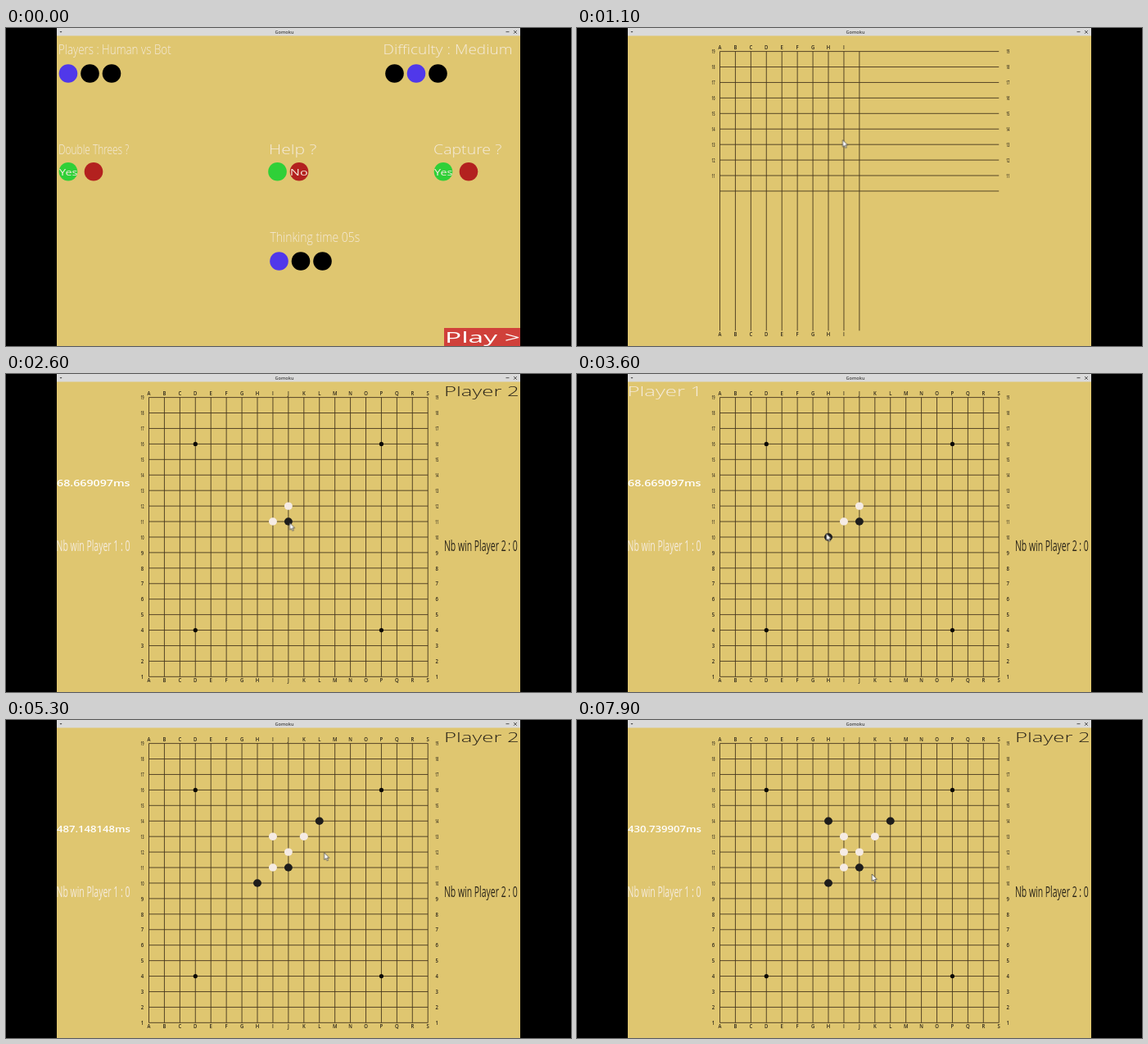
Animation, 690 px wide and 388 px high, one loop 8 s. Source, as an HTML page:

```html
<!DOCTYPE html>
<html lang="en">
<head>
<meta charset="utf-8">
<title>Gomoku</title>
<style>
  html, body { margin: 0; width: 100%; height: 100%; overflow: hidden; background: #000; }
  svg { display: block; width: 690px; height: 388px; }
  text { font-family: "Open Sans", sans-serif; white-space: pre; }
  #board line { stroke: #47371f; stroke-width: .9; }
  #cursor { animation: roam 8s linear infinite; }
  @keyframes roam {
    0%, 5% { transform: translate(586px, 377px); }
    7% { transform: translate(580px, 370px); }
    13.5%, 14.3% { transform: translate(324.5px, 136.5px); }
    20.5%, 22% { transform: translate(336px, 175.8px); }
    26%, 35% { transform: translate(346.5px, 181.5px); }
    42.5%, 49% { transform: translate(304.5px, 194.5px); }
    56%, 59% { transform: translate(381px, 121px); }
    65.5%, 67.5% { transform: translate(388.6px, 161.8px); }
    70% { transform: translate(386px, 164px); }
    80% { transform: translate(307.5px, 128px); }
    81.25%, 90% { transform: translate(304.8px, 122.5px); }
    98%, 100% { transform: translate(360.2px, 188px); }
  }
</style>
</head>
<body>
<svg viewBox="0 0 690 388">
  <rect width="690" height="388"/>
  <rect x="62" width="566" height="388" fill="#dfc670"/>
  <rect x="62" width="566" height="9.5" fill="#dadada"/>
  <text x="340" y="6.8" font-size="5.6" font-weight="600" text-anchor="middle" fill="#444">Gomoku</text>
  <path d="M65.5 4h3l-1.5 1.8z" fill="#444"/>
  <path d="M610.5 4.7h4M620 3l3.8 3.8M623.8 3l-3.8 3.8" stroke="#444" stroke-width=".9"/>
  <g id="menu"></g>
  <g id="board"></g>
  <g id="hud"></g>
  <g id="stones"></g>
  <g id="cursor"><path d="M0 0V8.7L2 6.9 3.4 9.9 4.8 9.3 3.4 6.4H6.1Z" fill="#fff" stroke="#333" stroke-width=".7"/></g>
</svg>
<script>
const LOOP = 8000, CELL = 18.93, LEFT = 174.5, TOP = 28.6;
const PALE = '#f5ebdc', DARK = '#2a2419', BLUE = '#5038ea', GREEN = '#2fd038', RED = '#b3211f';
const $ = id => document.getElementById(id);
const [menu, board, hud, stones] = ['menu', 'board', 'hud', 'stones'].map($);

function add(parent, tag, attrs, content = '') {
  const el = document.createElementNS('http://www.w3.org/2000/svg', tag);
  for (const key in attrs) el.setAttribute(key, attrs[key]);
  el.textContent = content;
  parent.append(el);
  return el;
}

// Lettering is wide or narrow by the horizontal scale.
function label(parent, str, x, y, size, scale, fill, weight = 400, anchor = 'start') {
  return add(parent, 'text', {
    transform: `translate(${x} ${y}) scale(${scale} 1)`,
    'font-size': size, 'font-weight': weight, 'text-anchor': anchor, fill
  }, str);
}

// Visible only in the given spans of the loop; each span is [from, to].
function during(el, ...spans) {
  const frames = [];
  const key = (opacity, time) => frames.push({ opacity, offset: time / LOOP, easing: 'step-end' });
  if (spans[0][0] > 0) key(0, 0);
  for (const [from, to = LOOP] of spans) {
    key(1, from);
    key(to < LOOP ? 0 : 1, to);
  }
  if (frames.at(-1).offset < 1) key(0, LOOP);
  el.animate(frames, { duration: LOOP, iterations: Infinity });
}

const dots = (x, y, gap, ...fills) => fills.forEach((fill, i) =>
  add(menu, 'circle', { cx: x + i * gap, cy: y, r: 11.3, fill }));

function drawMenu() {
  const heading = (str, x, y, scale) => label(menu, str, x, y, 17, scale, PALE, 300);
  heading('Players : Human vs Bot', 64, 32, .79);
  heading('Difficulty : Medium', 460.5, 32, 1.12);
  heading('Double Threes ?', 64.2, 154, .7);
  heading('Help ?', 321, 154, 1.24);
  heading('Capture ?', 522, 154, 1.15);
  heading('Thinking time 05s', 322.5, 261, .82);

  dots(76, 55.5, 26.5, BLUE, '#000', '#000');
  dots(474.5, 55.5, 26.5, '#000', BLUE, '#000');
  dots(76, 175.3, 31, GREEN, RED);
  dots(331.5, 175.3, 26.5, GREEN, RED);
  dots(534, 175.3, 31, GREEN, RED);
  dots(333.5, 284.5, 26.5, BLUE, '#000', '#000');

  label(menu, 'Yes', 65, 179.8, 11.5, 1.26, PALE);
  label(menu, 'No', 346.8, 179.8, 11.5, 1.4, PALE);
  label(menu, 'Yes', 523, 179.8, 11.5, 1.26, PALE);

  add(menu, 'rect', { x: 535, y: 366, width: 93, height: 22, fill: '#d0403a' });
  label(menu, 'Play >', 536, 384, 18, 1.86, '#fff');
  during(menu, [0, 600]);
}

function drawBoard() {
  const size = 18 * CELL, start = 670, step = 45;
  for (let i = 0; i < 19; i++) {
    const x = LEFT + i * CELL, y = TOP + i * CELL;
    const lines = add(board, 'g', {}), marks = add(board, 'g', {});
    add(lines, 'line', { x1: x, x2: x, y1: TOP, y2: TOP + size });
    add(lines, 'line', { x1: LEFT, x2: LEFT + size, y1: y, y2: y });

    const letter = String.fromCharCode(65 + i), row = 19 - i;
    const mark = (str, mx, my, scale) => label(marks, str, mx, my, 7, scale, DARK, 600, 'middle');
    for (const my of [26, 376.3]) mark(letter, x, my, .85);
    for (const mx of [166.5, 526.3]) mark(row, mx, y + 2.7, row > 9 ? .5 : .85);

    during(lines, [start + i * step]);
    during(marks, [start + (i + 1) * step]);
  }
  const stars = add(board, 'g', {});
  for (const c of [3, 15]) for (const r of [3, 15])
    add(stars, 'circle', { cx: LEFT + c * CELL, cy: TOP + r * CELL, r: 2.6, fill: '#0c0a06' });
  during(stars, [1530]);
}

function drawHud() {
  const wins = add(hud, 'g', {});
  label(wins, 'Nb win Player 1 : 0', 61.6, 216.3, 18, .58, PALE, 500);
  label(wins, 'Nb win Player 2 : 0', 535, 216.3, 18, .58, DARK, 500);
  during(wins, [1550]);

  during(label(hud, 'Player 1', 61.5, 27.3, 16.5, 1.56, PALE, 300),
    [1550, 1600], [2150, 2250], [3580, 4000], [4600, 5100], [6800, 7250]);
  during(label(hud, 'Player 2', 535, 27.3, 16.5, 1.56, DARK, 300),
    [1600, 2150], [2250, 3580], [4000, 4600], [5100, 6800], [7250]);

  const time = (str, scale, ...span) => during(label(hud, str, 62, 137, 11.5, scale, '#fff', 600), span);
  time('68.669097ms', 1.24, 2250, 5100);
  time('487.148148ms', 1.14, 5100, 7250);
  time('430.739907ms', 1.14, 7250);
}

function drawStones() {
  const moves = [['I11', 1600], ['J11', 2150], ['J12', 2250], ['H10', 3580], ['K13', 4000],
                 ['L14', 4600], ['I13', 5100], ['H14', 6800], ['I12', 7250]];
  moves.forEach(([cell, at], i) => during(add(stones, 'ellipse', {
    cx: LEFT + (cell.charCodeAt(0) - 65) * CELL,
    cy: TOP + (19 - cell.slice(1)) * CELL,
    rx: 5, ry: 4.7, fill: i % 2 ? '#1e1d1c' : '#f5ebe4'
  }), [at]));
}

drawMenu();
drawBoard();
drawHud();
drawStones();
during($('cursor').firstElementChild, [300]);
</script>
</body>
</html>
```
